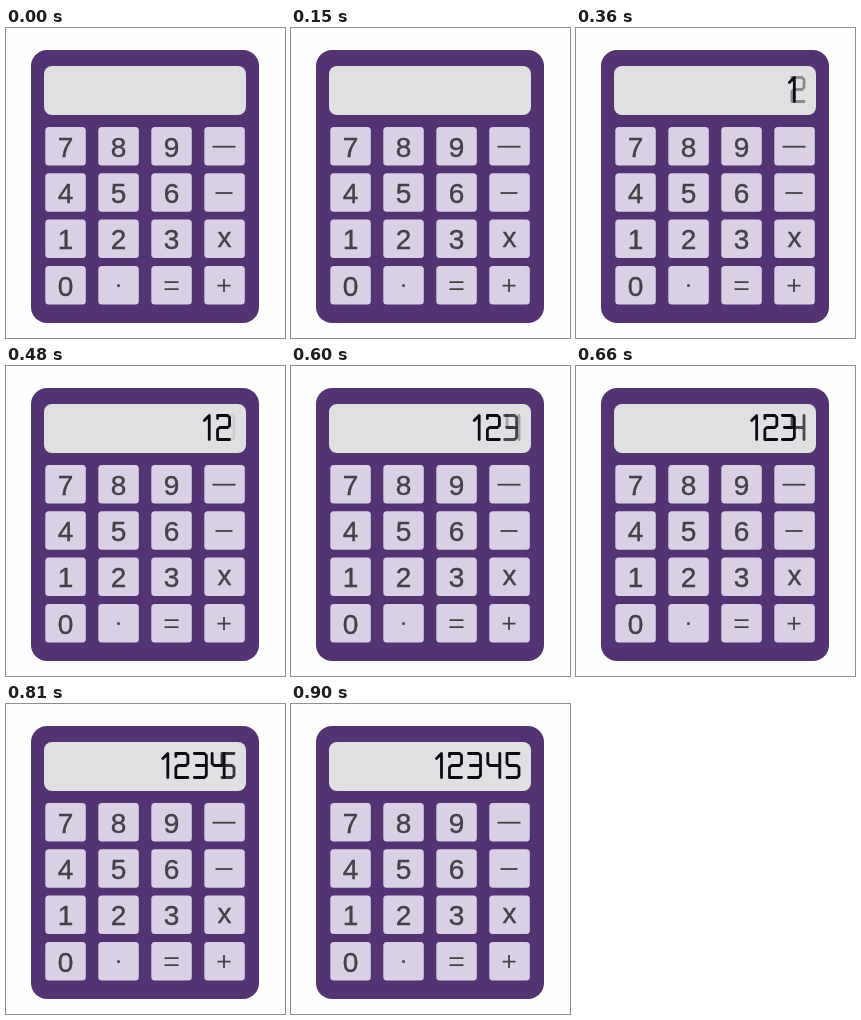
An HTML page that plays this animation: 279x310 px, repeating every 1.17 s.

```html
<!DOCTYPE html>
<html lang="en">
<head>
<meta charset="utf-8">
<title>Calculator</title>
<style>
  html, body { margin: 0; width: 100%; height: 100%; overflow: hidden; background: #fefefe; }
  svg { display: block; }
  text { font: 28px "Liberation Sans", Arial, sans-serif; text-anchor: middle; fill: #444046; stroke: #444046; stroke-width: .4; }
  .sign { fill: none; stroke: #444046; stroke-width: 1.8; }
  .digit { fill: none; stroke: #0c0a12; stroke-width: 2.8; stroke-linejoin: round; stroke-linecap: round; }
</style>
</head>
<body>
<svg width="279" height="310" viewBox="0 0 279 310">
  <rect x="25" y="22" width="228" height="273" rx="16" fill="#533371"/>
  <rect x="38" y="38" width="202" height="49" rx="8" fill="#e0dfe1"/>
  <g id="keys"></g>
  <g id="display"></g>
</svg>
<script>
const LOOP = 1170, STEP = 30, MOVE_END = 900;
const clamp = v => Math.max(0, Math.min(1, v));

function add(parent, tag, attrs, text = "") {
  const el = document.createElementNS("http://www.w3.org/2000/svg", tag);
  for (const name in attrs) el.setAttribute(name, attrs[name]);
  el.textContent = text;
  parent.append(el);
  return el;
}

// Operator signs are drawn around the centre of their key.
const signs = {
  "/": "M-12 0H11",
  "-": "M-9 0H8",
  "=": "M-7 -3.5H7M-7 3.5H7",
  "+": "M-7 0H6M-.5 -6.5V6.5",
  ".": "M-1.3 0H1.3"
};
const keys = document.getElementById("keys");
["789/", "456-", "123x", "0.=+"].forEach((row, r) => {
  [...row].forEach((key, c) => {
    const x = 39.3 + c * 53, y = 99 + r * 46.3;
    add(keys, "rect", { x, y, width: 40.5, height: 38.5, rx: 3.5, fill: "#d9d0e6" });
    const cx = x + 20.2, cy = y + 19.7;
    if (signs[key]) {
      const sign = add(keys, "path", { class: "sign", d: signs[key], transform: `translate(${cx} ${cy})` });
      if (key === ".") sign.style.strokeWidth = 2.6;
    } else {
      add(keys, "text", { x: cx, y: cy + (key === "x" ? 7.5 : 10) }, key);
    }
  });
});

// Each digit fades in at the right edge, then slides to its place.
const display = document.getElementById("display");
const digits = [
  { d: "M7 5L12 0V24", x: 138.5, shift: 76, fade: 170, span: 140, go: 295 },
  { d: "M0 3V0H10L12 2V10L10 12H2L0 14V24H12", x: 158.5, shift: 57.5, fade: 300, span: 150, go: 445 },
  { d: "M0 0H10L12 2V22L10 24H0M2 12H12", x: 177.5, shift: 38.5, fade: 465, span: 190, go: 580 },
  { d: "M0 0V10L2 12H12M12 0V24", x: 196.8, shift: 19.2, fade: 560, span: 140, go: 715 },
  { d: "M12 0H0V10L2 12H10L12 14V22L10 24H0", x: 216, shift: 0, fade: 690, span: 150, go: 850 }
];
for (const g of digits) g.el = add(display, "path", { class: "digit", d: g.d });

function draw(now) {
  const t = Math.floor((now % LOOP) / STEP) * STEP;
  for (const g of digits) {
    const left = 1 - clamp((t - g.go) / (MOVE_END - g.go));
    g.el.setAttribute("transform", `translate(${g.x + g.shift * left} 49.5)`);
    g.el.setAttribute("opacity", clamp((t - g.fade) / g.span));
  }
}

const start = performance.now();
function tick() {
  draw(performance.now() - start);
  requestAnimationFrame(tick);
}
tick();
</script>
</body>
</html>
```
